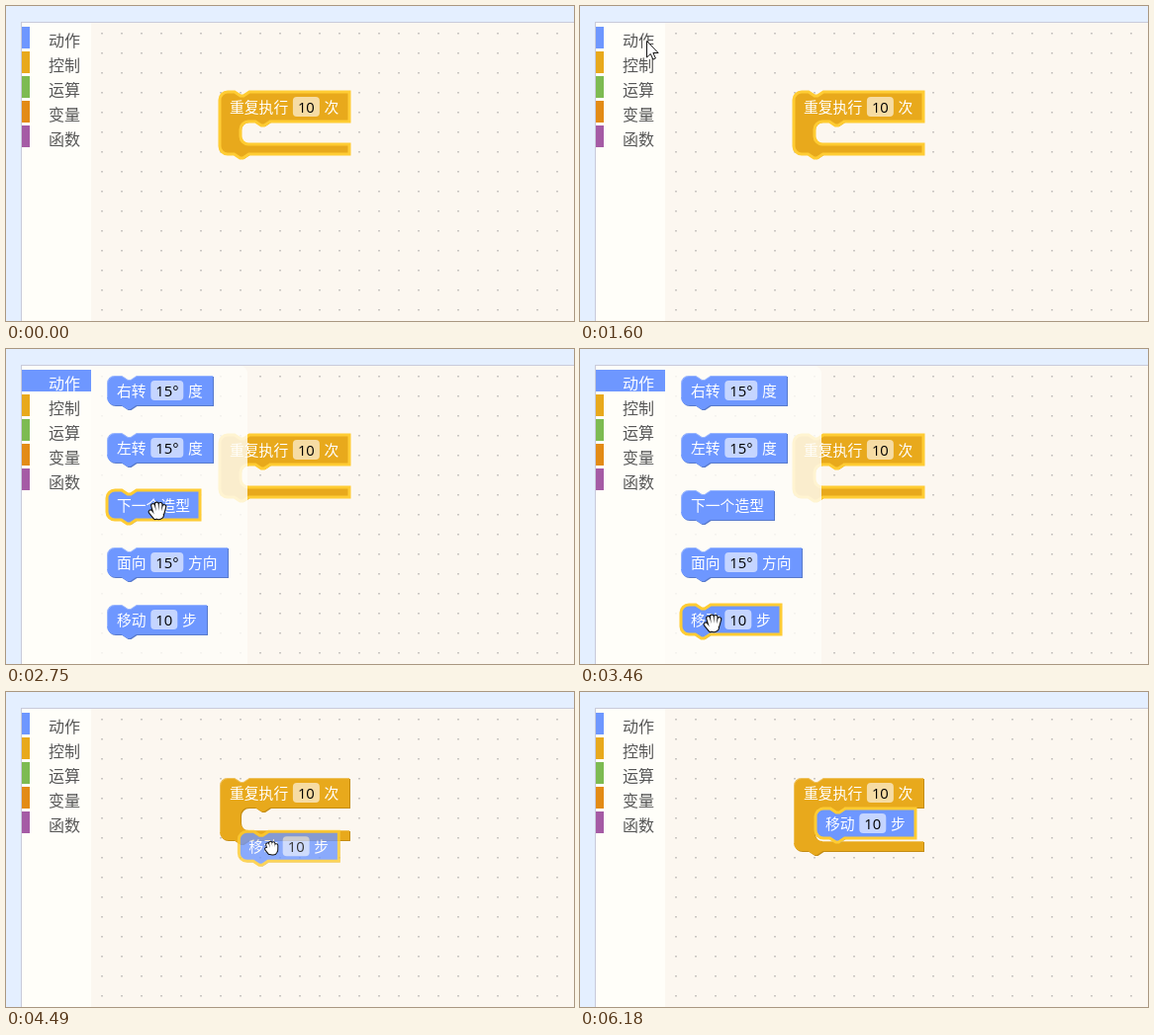
An HTML page with a canvas that plays this animation: 574 by 319 pixels, repeating every 7340 ms.

```html
<!DOCTYPE html>
<html lang="zh-CN">
<head>
<meta charset="utf-8">
<title>积木拖动演示</title>
<style>
html, body { margin: 0; width: 100%; height: 100%; overflow: hidden; background: #e4efff; }
canvas { display: block; }
</style>
</head>
<body>
<canvas id="stage" width="574" height="319"></canvas>
<script>
const W = 574, H = 319, LOOP = 7340;
const BLUE = '#6e97ff', GOLD = '#e8a91c', GLOW = '#ffcc33';
const SHADE = { [BLUE]: '#587acc', [GOLD]: '#c48c12' };
const CJK = '"Noto Sans CJK SC", "Noto Sans CJK", sans-serif';
const NUM = '"Open Sans", "Noto Sans", sans-serif';
const SIZE = 14.8, PAD = 10, GAP = 4.7, ROW = 30, ARM = 10, MOUTH = 21;

const stage = document.getElementById('stage').getContext('2d');
const layer = new OffscreenCanvas(W, H).getContext('2d');
let c = stage;

// Labels are strings; editable fields are wrapped in an array.
const MOVE = ['移动', ['10'], '步'];
const FLYOUT = [
  ['右转', ['15°'], '度'],
  ['左转', ['15°'], '度'],
  ['下一个造型'],
  ['面向', ['15°'], '方向'],
  MOVE
].map((parts, i) => ({ parts, x: 102, y: 27 + 58 * i }));
const REPEAT = { parts: ['重复执行', ['10'], '次'], x: 216, y: 87 };
const CHILD = { parts: MOVE, x: REPEAT.x + MOUTH + 1, y: REPEAT.y + ROW + 1 };
const MENU = [['动作', BLUE], ['控制', GOLD], ['运算', '#7dbb52'], ['变量', '#e38b16'], ['函数', '#a55ba5']];

const T = { enter: 230, open: 1810, press: 3610, drag: 3890, drop: 5120, leave: 6180 };

// Pointer glides; bow bends the way sideways.
const START = { x: 490, y: 312 };
const GLIDES = [
  { from: T.enter, to: 890, x: 138, y: 97 },
  { from: 990, to: 1600, x: 67, y: 35 },
  { from: 2180, to: 2750, x: 153, y: 163, bow: -0.4 },
  { from: 2850, to: 3170, x: 167, y: 272 },
  { from: 3330, to: 3460, x: 134, y: 277 },
  { from: 3850, to: 4620, x: 272, y: 148, bow: 0.25 },
  { from: 4700, to: 4720, x: 275, y: 142 },
  { from: 5100, to: T.drop, x: 271, y: 143 },
  { from: 5770, to: T.leave, x: 460, y: 319 }
];

// Speed peaks early, as in a hand movement.
function ease(u) {
  const v = Math.min(1, Math.max(0, u)) ** 0.77;
  return v * v * (3 - 2 * v);
}

function pointer(t) {
  let p = START;
  for (const g of GLIDES) {
    if (t < g.from) break;
    const s = ease((t - g.from) / (g.to - g.from));
    const side = 2 * s * (1 - s) * (g.bow || 0);
    const dx = g.x - p.x, dy = g.y - p.y;
    p = { x: p.x + s * dx - side * dy, y: p.y + s * dy + side * dx };
  }
  return p;
}

const fieldWidth = s => s === '10' ? 27 : 33;
const partWidth = p => Array.isArray(p) ? fieldWidth(p[0]) : p.length * SIZE;
const blockWidth = parts =>
  Math.ceil(parts.reduce((sum, p) => sum + partWidth(p) + GAP, 2 * PAD - GAP));

function text(s, x, y, size, family, color) {
  c.font = size + 'px ' + family;
  c.fillStyle = color;
  c.fillText(s, x, y);
}

const NOTCH = 'l6 4h3l6-4', NOTCH_BACK = 'l-6 4h-3l-6-4';

// mouth is the inner height of a loop block, absent for plain ones.
function outline(w, mouth) {
  const inner = mouth
    ? `H${MOUTH + 30}${NOTCH_BACK}h-7a8 8 0 0 0-8 8v${mouth - 16}a8 8 0 0 0 8 8H${w}v${ARM}` : '';
  return new Path2D(
    `M0 8a8 8 0 0 1 8-8H15${NOTCH}H${w}v${ROW}${inner}H29.5${NOTCH_BACK}H8a8 8 0 0 1-8-8z`);
}

function edgeLight(w, mouth) {
  const bottom = mouth ? ROW + mouth + ARM : ROW;
  const inner = mouth ? `M${MOUTH + 8} ${ROW + mouth + 0.5}H${w}` : '';
  return new Path2D(`M.5 ${bottom - 8}V8a7.5 7.5 0 0 1 7.5-7.5H15${NOTCH}H${w}${inner}`);
}

function stroke(path, color, width) {
  c.strokeStyle = color;
  c.lineWidth = width;
  c.stroke(path);
}

function block({ parts, x, y }, color, selected, mouth) {
  const w = blockWidth(parts), shape = outline(w, mouth);
  c.save();
  c.translate(x + 1, y + 1);
  c.fillStyle = SHADE[color];
  c.fill(shape);
  c.translate(-1, -1);
  c.fillStyle = color;
  c.fill(shape);
  if (selected) stroke(shape, GLOW, 3);
  else stroke(edgeLight(w, mouth), 'rgba(255,255,255,.28)', 1);
  let px = PAD;
  for (const p of parts) {
    const pw = partWidth(p);
    if (Array.isArray(p)) {
      c.fillStyle = 'rgba(255,255,255,.6)';
      c.beginPath();
      c.roundRect(px, 5, pw, 20, 4);
      c.fill();
      text(p[0], px + 5, 20.5, SIZE, NUM, '#000');
    } else {
      text(p, px, 20.8, SIZE, CJK, '#fff');
    }
    px += pw + GAP;
  }
  c.restore();
}

function workspace() {
  c.fillStyle = '#e4efff';
  c.fillRect(0, 0, W, H);
  c.fillStyle = '#c8cada';
  c.fillRect(15, 16, W, H);
  c.fillStyle = '#fcf7f0';
  c.fillRect(16, 17, W, H);
  c.fillStyle = '#c9c5c2';
  for (let x = 96; x < W; x += 20)
    for (let y = 27; y < H; y += 20) c.fillRect(x, y, 2, 1.5);
}

function toolbox(open) {
  c.fillStyle = '#fffef9';
  c.fillRect(16, 17, 70, H);
  MENU.forEach(([name, color], i) => {
    const active = open && i === 0;
    c.fillStyle = color;
    c.fillRect(16, 21 + 25 * i, active ? 70 : 8, 22);
    text(name, 43, 41 + 25 * i, 16, CJK, active ? '#fff' : '#575757');
  });
}

function flyout(hovered) {
  c.fillStyle = 'rgba(255,254,249,.8)';
  c.beginPath();
  c.roundRect(86, 17, 158, H, [0, 8, 0, 0]);
  c.fill();
  for (const b of FLYOUT) block(b, BLUE, b === hovered);
}

// The held block is half clear; a near joint lights up.
function dragged(p) {
  const b = { parts: MOVE, x: p.x - 33, y: p.y - 16 };
  if (Math.hypot(b.x - CHILD.x, b.y - CHILD.y) < 22)
    stroke(new Path2D(`M${CHILD.x} ${CHILD.y - 1}h14${NOTCH}h5`), GLOW, 4);
  layer.clearRect(0, 0, W, H);
  c = layer;
  block(b, BLUE, true);
  c = stage;
  c.globalAlpha = 0.8;
  c.drawImage(layer.canvas, 0, 0);
  c.globalAlpha = 1;
}

// The ring grows, stalls for a moment, then grows on and fades.
function ripple(t) {
  const age = t - T.drop;
  if (age < 0 || age >= 260) return;
  const k = age < 180 ? 0.36 * Math.min(1, age / 80) : 0.36 + 0.64 * (age - 180) / 80;
  const ring = new Path2D();
  ring.arc(260, 119, 25 * k, 0, 2 * Math.PI);
  c.globalAlpha = 1 - k;
  stroke(ring, '#888', 10);
  c.globalAlpha = 1;
}

const ARROW = new Path2D('M0 0V16.5L3.8 13 6.4 18.6 8.9 17.5 6.4 12H11.6z');

function arrow({ x, y }) {
  c.save();
  c.translate(x + 0.5, y + 0.5);
  c.fillStyle = '#fff';
  c.fill(ARROW);
  stroke(ARROW, '#111', 1);
  c.restore();
}

// Four fingers fan out from the palm, curled short when closed.
function hand({ x, y }, closed) {
  const spread = closed ? 2.9 : 3.4, reach = closed ? 2.8 : 4;
  const fingers = new Path2D();
  for (let i = 0; i < 4; i++) {
    fingers.moveTo(-4 + spread * i, -reach - 2.4 * Math.sin(Math.PI * (i + 0.4) / 3.4));
    fingers.lineTo(-2 + 2.2 * i, 2);
  }
  fingers.moveTo(closed ? -5 : -6.3, 0.8);
  fingers.lineTo(-2, closed ? 4.5 : 6);
  c.save();
  c.translate(x, y + 1);
  if (!closed) c.scale(1.1, 1.1);
  c.lineCap = 'round';
  for (const [color, rim] of [['#111', 1], ['#fff', 0]]) {
    stroke(fingers, color, 2.5 + 2 * rim);
    c.fillStyle = color;
    c.beginPath();
    c.ellipse(1.1, closed ? 2.8 : 4, 4.2 + rim, 3.4 + rim, 0, 0, 2 * Math.PI);
    c.fill();
  }
  c.restore();
}

const inside = (p, b, h = ROW) =>
  p.x > b.x && p.x < b.x + blockWidth(b.parts) && p.y > b.y && p.y < b.y + h;

function draw(t) {
  const p = pointer(t);
  const open = t >= T.open && t < T.drag;
  const joined = t >= T.drop;
  const holding = t >= T.press && !joined;
  const mouth = joined ? 34 : 23;
  const hovered = open && FLYOUT.find(b => inside(p, b));

  workspace();
  block(REPEAT, GOLD, t < T.press, mouth);
  if (joined) block(CHILD, BLUE, true);
  toolbox(open);
  if (open) flyout(hovered);
  if (t >= T.drag && !joined) dragged(p);
  ripple(t);

  if (t < T.enter || t >= T.leave) return;
  const overBlock = hovered || (!open && inside(p, REPEAT, ROW + mouth + ARM));
  if (holding || overBlock) hand(p, holding);
  else arrow(p);
}

const start = performance.now();
function tick() {
  draw((performance.now() - start) % LOOP);
  requestAnimationFrame(tick);
}
tick();
</script>
</body>
</html>
```
